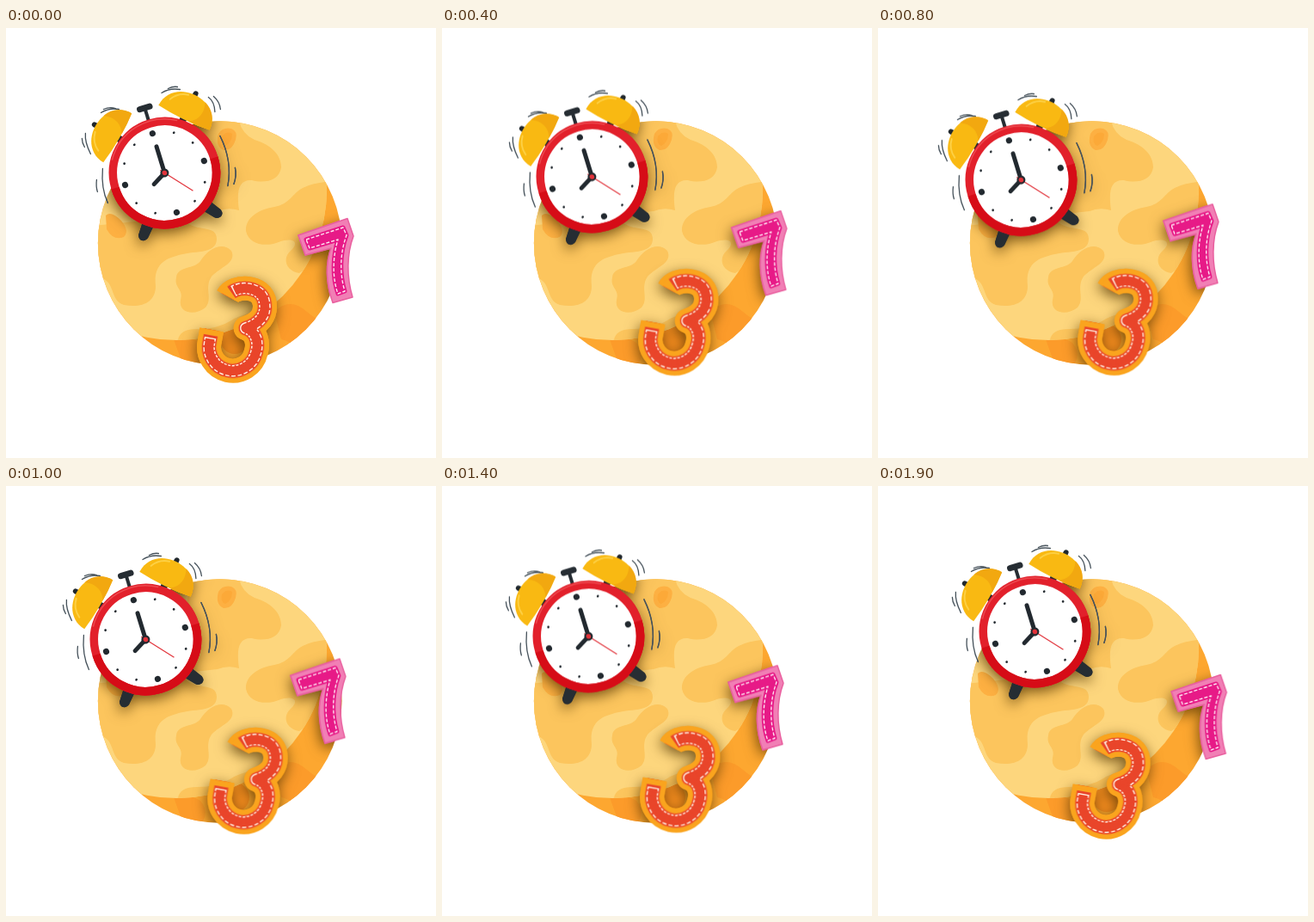
An HTML page that plays this animation: 500 by 500 pixels, repeating every 2000 ms.

```html
<!DOCTYPE html>
<html lang="en">
<head>
<meta charset="utf-8">
<title>Alarm clock planet</title>
<style>
  html, body { margin: 0; width: 100%; height: 100%; overflow: hidden; background: #fff; }
  svg { display: block; width: 100vw; height: 100vh; }
  .shadows { filter: drop-shadow(-1px 5px 8px rgba(80, 50, 0, .78)); }
  .lines { fill: none; stroke: #45515a; stroke-width: 1.3; stroke-linecap: round; }
</style>
</head>
<body>
<svg viewBox="0 0 500 500">
  <defs>
    <clipPath id="disc"><circle cx="248.700" cy="250" r="141.800"/></clipPath>
    <clipPath id="lit"><circle cx="198" cy="188" r="175"/></clipPath>

    <g id="bell">
      <path d="M0-60V-74" stroke="#20272d" stroke-width="8"/>
      <path d="M0-95V-102" stroke="#20272d" stroke-width="6" stroke-linecap="round"/>
      <path d="M-33-71C-32-110 32-110 33-71Q0-67-33-71Z" fill="#f9b912"/>
      <path d="M14-98C26-94 33-84 33-71Q20-69 6-69C16-74 20-86 14-98Z" fill="#f2a810"/>
      <path d="M-24-83Q-19-94-7-97" fill="none" stroke="#fdd044" stroke-width="2" stroke-linecap="round"/>
    </g>
    <path id="foot" d="M30 55L41 47L50 60Q52 66 47 68Q43 69 40 66Z" fill="#262d33"/>

    <g id="clock" transform="translate(184.400 168.500)">
      <path class="lines" d="M64.5-43Q79-14 73.5 15M82-6Q84 3 80.5 13M-72-5Q-74 18-66 35M-79 8Q-80 16-78 22
        M-96-40Q-96-35-93-30M-92-46Q-93-36-86-22M-74-70Q-64-76-53-74M-71-74Q-64-77-57-75
        M-3.5-93Q6-99 18-97M4-98Q10-101 15-100M51-88Q58-83 58.5-71M57-89Q64-83 65-74"/>
      <g transform="rotate(-17)">
        <use href="#foot"/>
        <use href="#foot" transform="scale(-1 1)"/>
        <path d="M0-62V-78" stroke="#262d33" stroke-width="4"/>
        <path d="M-6-79H6" stroke="#262d33" stroke-width="7" stroke-linecap="round"/>
        <use href="#bell" transform="translate(-8 -3) rotate(43)"/>
        <use href="#bell" transform="translate(8 -3) rotate(-43)"/>
        <circle r="60" fill="#fff" stroke="#e2202b" stroke-width="9.5"/>
        <path d="M60 0A60 60 0 0 1-60 0" fill="none" stroke="#d60c17" stroke-width="9.5"/>
        <path d="M-54-32A63 63 0 0 1 32-54" fill="none" stroke="#ee4a50" stroke-width="1.5"/>
        <g id="ticks" fill="#22292f"></g>
        <g stroke="#22292f" stroke-width="5" stroke-linecap="round">
          <path d="M0 0V-32"/>
          <path d="M0 0V-18" transform="rotate(240)"/>
        </g>
        <path d="M0 6V-39" transform="rotate(139)" stroke="#e2323a" stroke-width="1.2"/>
        <circle r="5" fill="#22292f"/>
        <circle r="2.8" fill="#e2323a"/>
      </g>
    </g>

    <path id="curve" pathLength="100" d="M257 313C264 300 297 299 300 321C302 335 294 345 278 350
      C291 354 293 368 290 378A27 27 0 0 1 236 366L238.500 352"/>
    <g id="three" fill="none" stroke-linejoin="round" transform="translate(.7 -1)">
      <use href="#curve" stroke="#faa41e" stroke-width="28"/>
      <use href="#curve" stroke="#f68d22" stroke-width="18"/>
      <use href="#curve" stroke="#e9452a" stroke-width="16"/>
      <use href="#curve" stroke="#fff0e2" stroke-width="13.5" stroke-dasharray="92 100" stroke-dashoffset="-4"/>
      <use href="#curve" stroke="#e9452a" stroke-width="10.600" stroke-dasharray="90.800 100" stroke-dashoffset="-4.600"/>
      <!-- cross bars cut the seam into stitches -->
      <use href="#curve" stroke="#e9452a" stroke-width="14" stroke-dasharray=".9 1.700"/>
      <use href="#curve" stroke="#faa41e" stroke-width="20" stroke-dasharray="2.800 94.400"/>
    </g>

    <g id="seven" stroke-linejoin="round">
      <path d="M340 241L397 221.500L404 242C396 263 396 290 403 313L380 319.500C371 295 372 272 378 256L348 264Z"
        fill="#f17fb5" stroke="#e9609f" stroke-width="1.5"/>
      <path id="inlay" d="M349 246L392 232L396 241C388 262 388 287 394 306L386 309C379 290 380 265 386 246L353 256Z"
        fill="#e71a87"/>
      <use href="#inlay" stroke="#e71a87" stroke-width="5"/>
      <use href="#inlay" stroke="#ffe6f3" stroke-width="1.4" stroke-dasharray="4 2"/>
    </g>
  </defs>

  <g clip-path="url(#disc)">
    <path d="M100 100H400V400H100Z" fill="#fda730"/>
    <path d="M195 362Q215 358 226 366Q238 380 225 395L205 390ZM312 330Q330 312 350 330T385 335L350 385Q335 365 320 362Z" fill="#fc9b2a"/>
    <circle cx="266" cy="362" r="17" fill="#f68d1f"/>
    <g clip-path="url(#lit)">
      <path d="M100 100H400V400H100Z" fill="#fdd67d"/>
      <g fill="#fcc55d">
        <path d="M215 100H270Q271 122 289 130C309 136 320 148 320 162C318 178 300 181 286 177
          C270 176 268 190 271 212Q258 208 246 213L200 218Z"/>
        <path d="M385 178Q358 179 345 186C333 192 330 205 312 208C292 211 278 222 279 236C282 252 302 255 317 249
          C334 243 342 249 331 259C321 268 325 282 341 285L380 260Z"/>
        <path d="M100 230L150 225L205 220C216 240 246 226 245 246C244 264 218 258 198 265C178 270 172 282 174 300
          C174 319 158 326 137 322C120 317 128 293 108 290Z"/>
        <path d="M198 290C200 276 219 281 226 271C235 256 252 248 262 259C269 273 249 278 239 289C230 302 241 315 232 325
          C220 335 200 332 203 316C207 304 195 302 198 290Z"/>
        <path d="M200 370Q197 350 222 350T262 340T305 330L310 370Z"/>
      </g>
      <path d="M247 123Q252 115 262 117Q270 120 267 130Q263 143 253 142Q243 138 247 123ZM116 218Q122 212 134 224Q144 236 137 243Q125 248 117 234Z" fill="#fdb042"/>
      <path d="M251 126Q257 119 263 123Q263 133 255 137Q249 135 251 126Z" fill="#fca938"/>
    </g>
    <g class="shadows">
      <use href="#clock" data-part="clock"/>
      <use href="#three" data-part="three"/>
      <use href="#seven" data-part="seven"/>
    </g>
  </g>
  <use href="#clock" data-part="clock"/>
  <use href="#three" data-part="three"/>
  <use href="#seven" data-part="seven"/>
</svg>
<script>
  const ticks = document.getElementById('ticks');
  for (let hour = 0; hour < 12; hour++) {
    const dot = document.createElementNS('http://www.w3.org/2000/svg', 'circle');
    const angle = hour * Math.PI / 6;
    dot.setAttribute('cx', 48 * Math.sin(angle));
    dot.setAttribute('cy', -48 * Math.cos(angle));
    dot.setAttribute('r', hour % 3 ? 1.4 : 3.6);
    ticks.append(dot);
  }

  // Each stop: [position along the path, dx, dy].
  const paths = {
    clock: [[0, 0, 0], [11, -22, 10]],
    three: [[0, 0, 0], [1, 1.5, -2], [3, 3.5, -6], [5, 6.3, -8.5], [7, 8.3, -9.6], [11, 12.5, -7.8]],
    seven: [[0, 0, 0], [1, 1.3, -2], [2, 1.2, -4], [3, 0, -6], [5, -3.2, -8.8], [7, -7, -12.7], [11, -9.1, -20.5]]
  };
  // There and back, held 100 ms per position.
  const order = [0, 1, 2, 3, 5, 6, 7, 8, 9, 10, 11, 10, 9, 8, 7, 5, 4, 3, 2, 1];

  function place(stops, pos) {
    const i = Math.max(1, stops.findIndex(stop => stop[0] >= pos));
    const [a, ax, ay] = stops[i - 1], [b, bx, by] = stops[i];
    const k = (pos - a) / (b - a);
    return `translate(${ax + (bx - ax) * k}px, ${ay + (by - ay) * k}px)`;
  }

  for (const part of document.querySelectorAll('[data-part]')) {
    const frames = [...order, 0].map((pos, i) => ({
      offset: i / order.length,
      transform: place(paths[part.dataset.part], pos),
      easing: 'step-end'
    }));
    part.animate(frames, { duration: 2000, iterations: Infinity });
  }
</script>
</body>
</html>
```
